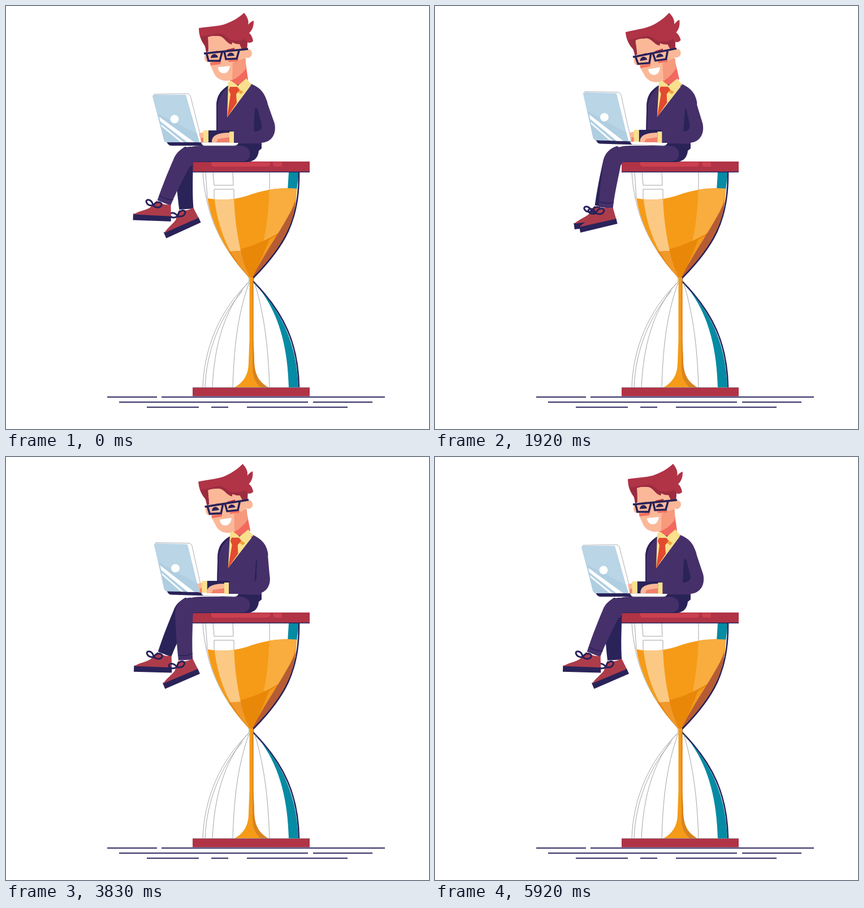
An HTML page for the animation above (6010 ms loop, 748 px wide and 748 px high).

```html
<!DOCTYPE html>
<html lang="en">
<head>
<meta charset="utf-8">
<title>Working on the hourglass</title>
<style>
  html, body { margin: 0; width: 100%; height: 100%; overflow: hidden; background: #fff; }
  svg { display: block; width: 100vw; height: 100vh; }
  .navy { fill: #2a2359; }
  .suit { fill: #46306a; }
  .red { fill: #b03346; }
  .skin { fill: #fbb898; }
  .blush { fill: #f2806b; }
  .cream { fill: #f9e08c; }
  .sand { fill: #f59b18; }
  .teal { fill: #058ba3; }
  .thin { fill: none; stroke: #8d8d96; stroke-width: .8; }
  .ink { fill: none; stroke: #27215a; stroke-width: 2; }
  .fine { stroke-width: 1.5; }
  .bold { stroke-width: 3; }
</style>
</head>
<body>
<svg viewBox="0 0 748 748">
  <defs>
    <clipPath id="sandClip">
      <path id="sandShape" d="M356 340C385 345 408 342 431 334C456 325 485 320 514 323C512 390 487 428 434 484C402 452 366 400 356 340Z"/>
    </clipPath>
    <g id="foot">
      <path class="navy" d="M250 387L316 375L318 385L252 398Z"/>
      <path fill="#ad3c4b" d="M251 388C257 381 270 376 276 370L285 355C294 359 303 359 311 356L316 376Z"/>
      <path class="ink bold" d="M281 365C275 352 263 357 269 363C272 367 277 366 281 365C284 354 297 355 295 362C292 368 285 367 281 365"/>
    </g>
    <path id="shin" d="M297 278C299 262 308 252 322 248L340 262L329 277C324 300 315 330 311 358L286 354C289 325 293 300 297 278Z"/>
  </defs>

  <!-- ground -->
  <path class="ink" d="M179 691.5H267M275 691.5H670M200 700.5H534M543 700.5H648M249 709.5H341M363 709.5H393M426 709.5H604"/>

  <!-- upper glass -->
  <path class="teal" d="M500 294H518L514 326H498Z"/>
  <path class="thin" d="M348 294C353 370 380 425 428 478Q432 484 428 490M353 294L356 340M366 294L368 317H402L401 294M368 341V324H403V341M466 294V326"/>
  <use href="#sandShape" class="sand"/>
  <g clip-path="url(#sandClip)">
    <path fill="#f8ad3e" d="M466 315H516C508 375 475 430 440 470C458 420 465 370 466 315Z"/>
    <path fill="#e98708" d="M380 434C425 434 468 412 520 378L440 490Z"/>
    <path fill="#f39b1d" d="M465 414L492 397C480 425 465 445 444 466Z"/>
    <path fill="#fbc983" d="M368 335H403C404 375 409 405 415 433L397 434C382 405 372 375 368 335Z"/>
    <path fill="#f0982a" d="M397 434L415 433C419 452 425 467 431 480C418 468 407 450 397 434Z"/>
    <path fill="#b65c35" d="M518 330C503 376 463 424 434 484L525 480Z"/>
  </g>
  <path class="ink" style="stroke-width:2.5" d="M518 294C519 380 492 425 438 480Q435 484 438 488C492 543 517 598 518 675"/>

  <!-- lower glass -->
  <path class="teal" d="M438 489C490 543 514 598 517 675H500C498 600 482 540 441 491Z"/>
  <path class="thin" d="M428 490C378 538 350 605 348 675M418 504C378 550 354 612 352 675M427 490C384 540 368 605 365 675M430 489C408 550 403 610 401 675M440 491C458 550 464 610 466 675"/>
  <path class="sand" d="M430.5 480H437.5V590L439 630C440 655 450 667 465 675H403C420 666 429 652 429 630L430.5 590Z"/>
  <path fill="#d9831f" d="M435.5 486H437.5V590L439 630C440 655 450 667 465 675H451C438 664 435 650 436 630Z"/>

  <!-- plates -->
  <path class="red" d="M330 275H537V293H330ZM330 675H537V690H330Z"/>
  <path fill="#cb4050" d="M363 276H467V280Q466 284 461 284H368Q364 284 363 280ZM472 276H488V284H476Q472 283 472 276Z"/>
  <path class="ink fine" d="M330 293.5H537"/>
  <path class="thin" d="M330 674.5H537"/>

  <!-- legs -->
  <g id="farLeg">
    <use href="#shin" class="navy"/>
    <use href="#foot"/>
  </g>
  <path class="navy" d="M400 240H452V252L447 256C446 269 438 276 424 276H330V262Z"/>
  <g id="nearLeg">
    <use href="#shin" class="suit"/>
    <path class="ink fine" d="M288 345Q300 350 313 347"/>
    <use href="#foot"/>
  </g>
  <path class="suit" d="M303 268C310 253 325 247 345 247H415C428 248 432 256 431 264C430 272 424 275 412 275H333L326 285Z"/>

  <!-- head -->
  <g id="head">
    <path fill="#f2685e" d="M396 128L424 102L428 130L411 150L397 142Z"/>
    <circle class="skin" cx="427" cy="84" r="8"/>
    <ellipse class="skin" cx="356" cy="91" rx="5" ry="8"/>
    <path class="skin" d="M356 52H420L424 111C417 120 406 130 394 132C380 134 370 126 367 117L361 104Z"/>
    <path fill="#f6997c" d="M401 100L424 92V111C417 120 409 127 400 131Z"/>
    <path fill="#f4715f" d="M361 100L380 98L379 103L362 105ZM393 96L411 93L410 98L394 99Z"/>
    <path fill="#fff" d="M375 108L396 106C395 115 390 119 385 119C379 119 375 114 375 108Z"/>
    <path class="red" d="M341 39C360 36 378 36 390 31C403 26 412 20 421 12C427 19 430 27 428 33C431 30 434 27 438 26C438 34 437 41 430 48C434 51 436 56 437 62C434 65 430 66 427 64L426 76L418 78L413 67C409 68 404 66 400 64L399 68C390 66 386 54 377 53C370 53 363 52 357 55L358 80L354 82C353 74 352 70 350 68C344 60 341 50 341 39Z"/>
    <path fill="#9b2c40" d="M344 53C352 55 366 48 380 49C390 52 394 61 402 61C410 62 418 62 423 58L427 64L426 76L418 78L413 67C409 68 404 66 400 64L399 68C390 66 386 54 377 53C370 53 363 52 357 55L358 80L354 82C353 74 352 70 350 68C347 63 345 58 344 53Z"/>
    <path class="red" d="M361 82L374 79V82L361 84ZM390 77L404 74V78L390 79Z"/>
    <path class="navy" d="M362 92C363 83 373 83 375 91ZM391 89C392 81 402 80 404 88Z"/>
    <path class="ink" style="stroke-width:3.5" d="M350 84L428 76M355 85L358 97H378L382 82M386 81L389 94L408 93L412 79"/>
  </g>

  <!-- torso -->
  <g id="torso">
    <path class="suit" d="M392 141C379 150 372 160 372 178V243H451C452 205 461 190 461 170C458 152 447 143 432 137Z"/>
    <path class="navy" d="M391 142C378 151 372 160 372 178V222H374V180C375 164 382 152 391 146Z"/>
    <path class="cream" d="M393 135L398 132L410 141L425 128L434 139L391 197Z"/>
    <path fill="#efa23a" d="M410 146L420 152L416 156L408 151Z"/>
    <path fill="#e34a30" d="M396 143H409L413 148L407 156L408 171L391 197L397 156L394 149Z"/>
    <path class="navy" d="M440 181H446L453 213C452 219 446 223 438 222Z"/>
  </g>

  <!-- laptop -->
  <g id="laptop">
    <path class="navy" d="M284 240H350V247H292Q287 247 284 240Z"/>
    <path fill="#fff" stroke="#9a9aa4" stroke-width=".8" d="M262 156L320 155Q324 155 326 159L347 241H340Z"/>
    <path fill="#b9d5e6" d="M260 157H318L342 241H284Q281 241 279 236L259 160Z"/>
    <path fill="#b0cee1" d="M268 190L338 226L342 241H284Q281 241 279 236Z"/>
    <path fill="#fff" d="M271 196L333 241H321L273 204ZM274 209L314 241H309L275 213Z"/>
    <circle fill="#fff" cx="298" cy="200" r="7.5"/>
    <path fill="#fff" stroke="#9a9aa4" stroke-width=".8" d="M345 241H411Q410 247 403 247H350Q346 246 345 241Z"/>
  </g>

  <!-- arms -->
  <g id="farArm">
    <path class="skin" d="M341 225L350 223V241H345Z"/>
    <path class="blush" d="M345 233H350V241H345Z"/>
    <path class="navy" d="M358 220H398V241H358Z"/>
    <path class="cream" d="M349 220H358V241H349Z"/>
  </g>
  <g id="nearHand">
    <path class="skin" d="M364 241C363 229 375 224 395 224V241Z"/>
    <path class="blush" d="M375 235L395 232V241H372Z"/>
    <path class="cream" d="M395 222H404V242H395Z"/>
  </g>
  <path id="sleeve" class="suit"/>
</svg>
<script>
  const LOOP = 6010, STEP = 250 / 3, LAST = 71;
  const [farLeg, nearLeg, head, torso, laptop, farArm, nearHand, sleeve] =
    ['farLeg', 'nearLeg', 'head', 'torso', 'laptop', 'farArm', 'nearHand', 'sleeve']
      .map(id => document.getElementById(id));

  const place = (el, value) => el.setAttribute('transform', value);
  const ease = x => {
    x = Math.min(1, Math.max(0, x));
    return x * x * (3 - 2 * x);
  };

  // Upper arm hangs from a fixed shoulder, elbow and forearm slide by dx.
  const armPath = (dx, lean) => {
    const e = x => (x + dx).toFixed(2);
    return `M${432 + lean} 140C${450 + lean} 146 461 160 463 174L${e(475)} 208` +
      `C${e(479)} 228 ${e(468)} 242 ${e(450)} 242H${e(403)}V222H${e(438)}` +
      `C${e(449)} 222 ${e(454)} 217 ${e(452)} 209L444 180Z`;
  };

  function pose(i) {
    const swing = 13.3 * Math.cos(i * Math.PI / 9);
    const far = Math.abs(i % 36 - 18);
    const rock = ease((15 - far) / 7);
    const nod = ease((13 - far) / 9.3);
    const reach = ease((6.7 - Math.abs(i % 18 - 11)) / 4);
    const slide = -8 * reach - rock;

    place(nearLeg, `rotate(${swing} 322 270)`);
    place(farLeg, `rotate(${-swing} 322 270)`);
    place(head, `translate(${4 * rock} ${rock}) rotate(${-5.6 * nod} 405 130)`);
    place(torso, `rotate(${1.3 * rock} 420 275)`);
    place(laptop, `rotate(${1.9 * rock} 400 243)`);
    place(farArm, `translate(${3 * rock - 5.5 * reach} ${-rock})`);
    place(nearHand, `translate(${slide} 0)`);
    sleeve.setAttribute('d', armPath(slide, 2 * rock));
  }

  const start = performance.now();
  function tick() {
    const t = (performance.now() - start) % LOOP;
    pose(Math.min(LAST, Math.floor((t + 5) / STEP)));
    requestAnimationFrame(tick);
  }
  pose(0);
  requestAnimationFrame(tick);
</script>
</body>
</html>
```
